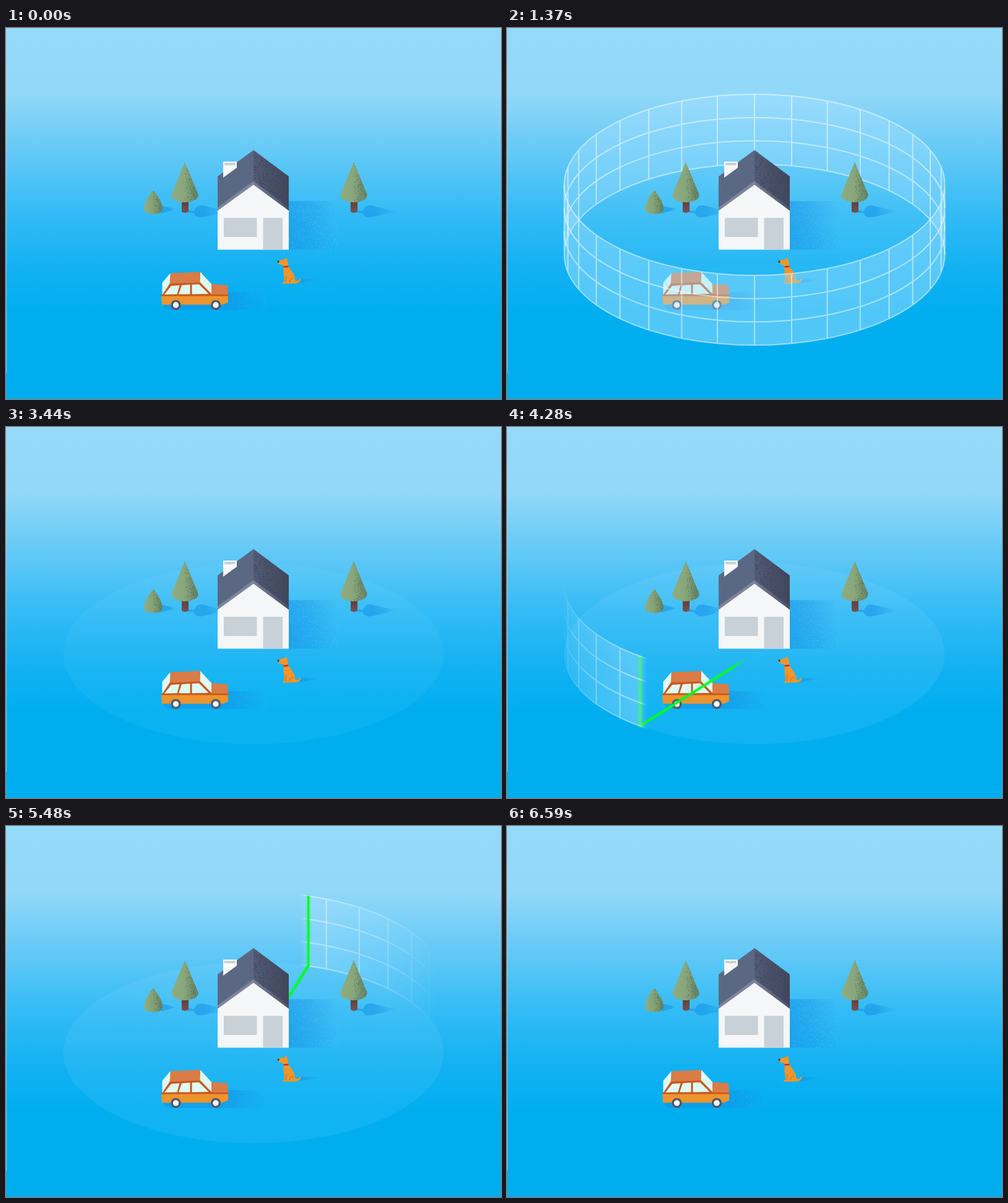
An HTML page with a canvas that plays this animation: 800x600 px, repeating every 6.62 s.

```html
<!DOCTYPE html>
<html lang="en">
<head>
<meta charset="utf-8">
<title>Home perimeter</title>
<style>
html, body { margin: 0; width: 100%; height: 100%; overflow: hidden; background: #00aef0; }
canvas { display: block; width: 800px; height: 600px; }
</style>
</head>
<body>
<canvas id="stage" width="800" height="600"></canvas>
<script>
const LOOP = 6620;
const CX = 400, CY = 366.5, RX = 307.5, RY = 146.5, WALL = 113;
const PI = Math.PI;
const ctx = document.getElementById('stage').getContext('2d');

// ---------- helpers ----------
let seed = 7;
const rand = () => (seed = (seed * 16807) % 2147483647) / 2147483647;
const clamp = (v, lo = 0, hi = 1) => Math.min(hi, Math.max(lo, v));
const sine = p => (1 - Math.cos(PI * clamp(p))) / 2;

function track(keys, t) {
  if (t <= keys[0][0]) return keys[0][1];
  for (let i = 1; i < keys.length; i++) {
    const [t1, v1] = keys[i], [t0, v0] = keys[i - 1];
    if (t <= t1) return v0 + (v1 - v0) * (t - t0) / (t1 - t0);
  }
  return keys[keys.length - 1][1];
}

function ramp(c, x0, y0, x1, y1, stops) {
  const g = c.createLinearGradient(x0, y0, x1, y1);
  stops.forEach(([p, color]) => g.addColorStop(p, color));
  return g;
}

function shape(c, d, paint) {
  c.fillStyle = paint;
  c.fill(new Path2D(d));
}

// Seeded specks inside a path; chance(u) sets density from left to right.
function grain(c, d, x, y, w, h, color, count, chance) {
  c.save();
  c.clip(new Path2D(d));
  c.fillStyle = color;
  for (let i = 0; i < count; i++) {
    const u = rand(), v = rand();
    if (rand() < chance(u)) c.fillRect(Math.floor(x + u * w), Math.floor(y + v * h), 1, 1);
  }
  c.restore();
}

// ---------- scenery ----------
const SHADE = 'rgba(20,145,230,.55)', CLEAR = 'rgba(20,145,230,0)';

function tree(c, x) {
  c.save();
  c.translate(x, 0);
  shape(c, 'M6 295 L15 296 Q18 286 28 287 L70 297 L28 306 Q18 308 14 299 L5 299 Z',
    ramp(c, 8, 0, 70, 0, [[0, SHADE], [.4, SHADE], [1, CLEAR]]));
  shape(c, 'M-5 278 H6 V297 Q0 301 -5 297 Z',
    ramp(c, 0, 278, 0, 299, [[0, '#5a3b3e'], [1, '#7a5150']]));
  const cone = 'M0 217 L21.5 269 Q23 276 12 280 Q0 284 -12 280 Q-23 276 -21.5 269 Z';
  shape(c, cone, ramp(c, -22, 0, 22, 0, [[0, '#8fad80'], [.5, '#88a67b'], [.7, '#789771'], [1, '#668467']]));
  grain(c, cone, 0, 217, 22, 66, '#58755d', 700, u => .15 + u * .4);
  c.restore();
}

function house(c) {
  const dark = 'M457 280 H536 V358.5 H457 Z';
  shape(c, dark, ramp(c, 457, 0, 536, 0, [[0, SHADE], [.45, 'rgba(20,145,230,.35)'], [1, CLEAR]]));
  grain(c, dark, 457, 280, 79, 79, 'rgba(80,195,248,.5)', 2200, u => .2 + u * .3);
  shape(c, 'M342 293 L400 252 L457 293 V358.5 H342 Z', '#f5f6f7');
  shape(c, 'M342 240 L400 197.5 V249 L342 292 Z', '#5b6883');
  const right = 'M400 197.5 L457 240 V292 L400 249 Z';
  shape(c, right, ramp(c, 400, 0, 457, 0, [[0, '#535d78'], [.5, '#484f67'], [1, '#41475d']]));
  grain(c, right, 400, 197, 57, 95, '#3a4056', 1500, u => .5 - u * .3);
  shape(c, 'M342 290 L400 247.5 V253.5 L342 295.5 Z', '#7d849b');
  shape(c, 'M400 247.5 L457 290 V295.5 L400 253.5 Z',
    ramp(c, 400, 0, 457, 0, [[0, '#777d94'], [1, '#4a5067']]));
  shape(c, 'M351 216 H373 V226 L351 242 Z', '#f7f8f8');
  shape(c, 'M353 218 H370.5 V222 H353 Z', '#cbd1d6');
  shape(c, 'M352 307 H405.5 V338 H352 Z', '#c9d1d8');
  shape(c, 'M415.5 307 H447 V358.5 H415.5 Z', '#c9d1d8');
}

function wheel(c, x) {
  [[8, '#50566b'], [4.7, '#ffffff']].forEach(([r, color]) => {
    c.fillStyle = color;
    c.beginPath();
    c.arc(x, 448, r, 0, 2 * PI);
    c.fill();
  });
}

function car(c) {
  const glass = '#ddfaf5', trim = '#c9571c', top = '#d97c45';
  const dark = 'M254 446 L350 440 L359 427 L420 429 V456 H262 Q254 454 254 446 Z';
  shape(c, dark, ramp(c, 254, 0, 418, 0, [[0, SHADE], [.65, SHADE], [1, CLEAR]]));
  grain(c, dark, 355, 427, 65, 29, 'rgba(40,180,245,.5)', 600, u => .2 + u * .3);
  shape(c, 'M265.5 396.5 L252.5 412 L252.5 432 L265.5 414 Z', glass);
  shape(c, 'M314 394.5 L332 414 V432 L313 413 Z', glass);
  shape(c, 'M266 396.5 L314 394.5 L313.5 413 L264.5 415 Z', top);
  shape(c, 'M264.5 413.5 L314 411.5 L333 431 V434 H251 Z', trim);
  shape(c, 'M267 417 L280.5 416 L276.5 430.5 L256 431 Z', glass);
  shape(c, 'M284 416 L297.5 415 V430.5 L279 430.5 Z', glass);
  shape(c, 'M300.5 415 L312 414.5 L327.5 430 L300.5 430.5 Z', glass);
  shape(c, 'M332 414 L358 416 L359 431.5 H332 Z', top);
  shape(c, 'M251 431 H359 V444 L350 447.5 H252 Z', '#ec942e');
  shape(c, 'M251 431 H359 V433.5 H251 Z', trim);
  wheel(c, 274.5);
  wheel(c, 339);
}

function bush(c) {
  shape(c, 'M250 287 L275 293 L250 300 Z', ramp(c, 250, 0, 275, 0, [[0, SHADE], [.6, SHADE], [1, CLEAR]]));
  const egg = 'M238 262 C244 269 253 283 253 292 C253 298 246 301 238 301 C230 301 223 298 223 292 C223 283 232 269 238 262 Z';
  shape(c, egg, ramp(c, 223, 0, 253, 0, [[0, '#8fad80'], [.5, '#83a177'], [1, '#64825f']]));
  grain(c, egg, 238, 262, 16, 39, '#5a775d', 350, u => .15 + u * .4);
}

const DOG = new Path2D('M439 377 L445 375 L449.5 374 L453.5 371.5 L455 376 L456.5 386 L463 395 Q468 402 467 408 ' +
  'Q473 410 475 405.5 L477 406.5 Q475 412 469 413 L447 413.5 Q446.5 411.5 450 410.5 L449.5 402 Q447.5 395 449 386 L447 383.5 L441 382 Z');

function dog(glow) {
  ctx.fillStyle = '#f0962b';
  ctx.fill(DOG);
  shape(ctx, 'M448.5 385 L456.5 384.5 V387 L449 387.5 Z', '#d2232a');
  shape(ctx, 'M438.6 376.6 H441.4 V379.6 H439 Z', '#30303a');
  ctx.strokeStyle = '#c9651f';
  ctx.lineWidth = 1;
  ctx.stroke(new Path2D('M453 401 L452.5 411 M465 405 Q459 404 458 411'));
  if (glow <= 0) return;
  ctx.save();
  ctx.globalAlpha = glow;
  ctx.shadowColor = '#00ff2a';
  ctx.fillStyle = '#fff373';
  [26, 14, 7].forEach(blur => { ctx.shadowBlur = blur; ctx.fill(DOG); });
  ctx.restore();
}

function buildScene() {
  const layer = document.createElement('canvas');
  layer.width = 800;
  layer.height = 600;
  const c = layer.getContext('2d');
  bush(c);
  tree(c, 289);
  tree(c, 562);
  house(c);
  car(c);
  shape(c, 'M466 409 L478 405.5 L508 407 L478 412 L462 413 Z',
    ramp(c, 464, 0, 508, 0, [[0, SHADE], [.4, SHADE], [1, CLEAR]]));
  return layer;
}

const scene = buildScene();
const sky = ramp(ctx, 0, 0, 0, 600, [[0, '#96daf9'], [.18, '#91d8f8'], [.3, '#6eccf7'],
  [.5, '#33bbf5'], [.65, '#12b1f2'], [.765, '#00aef0'], [1, '#00aef0']]);

// ---------- wall ----------
const tint = a => `rgba(165,225,255,${a})`;
const white = a => `rgba(255,255,255,${a})`;

// One half of the ring: rings hang from the top edge and end at the ground.
function wall(front, h, fill, line) {
  const a0 = front ? 0 : PI;
  ctx.fillStyle = fill;
  ctx.beginPath();
  ctx.ellipse(CX, CY, RX, RY, 0, a0, a0 + PI);
  ctx.ellipse(CX, CY - h, RX, RY, 0, a0 + PI, a0, true);
  ctx.fill();
  ctx.strokeStyle = line;
  ctx.lineWidth = 2;
  ctx.beginPath();
  for (let k = 0; k < 4; k++) {
    const y = h - k * WALL / 3;
    if (y < -.01) break;
    ctx.moveTo(CX + RX * Math.cos(a0), CY - y);
    ctx.ellipse(CX, CY - y, RX, RY, 0, a0, a0 + PI);
  }
  for (let i = 0; i < 16; i++) {
    const a = a0 + i * PI / 16, x = CX + RX * Math.cos(a), y = CY + RY * Math.sin(a);
    ctx.moveTo(x, y);
    ctx.lineTo(x, y - h);
  }
  ctx.stroke();
}

// ---------- sweep ----------
const SWEEP = 3890, TRAIL = 58;

function leadAngle(t) {
  const s = (t - SWEEP) / 1000;
  return 180 - 128 * s - 19.6 * s * s;
}

function trailAlpha(d) {
  if (d < -2.2 || d > TRAIL) return 0;
  return d < 0 ? 1 + d / 2.2 : Math.pow(1 - d / TRAIL, 1.25);
}

function sweepPaint(front, lead, color, strength) {
  const g = ctx.createLinearGradient(CX - RX, 0, CX + RX, 0), n = 100;
  for (let i = 0; i <= n; i++) {
    const a = Math.acos(2 * i / n - 1) * 180 / PI;
    g.addColorStop(i / n, color((trailAlpha((front ? a : -a) - lead) * strength).toFixed(3)));
  }
  return g;
}

function sweepWall(front, lead) {
  wall(front, WALL, sweepPaint(front, lead, tint, .42), sweepPaint(front, lead, white, .5));
}

function beam(lead, alpha) {
  const a = lead * PI / 180, x = CX + RX * Math.cos(a), y = CY + RY * Math.sin(a);
  ctx.save();
  ctx.globalAlpha = alpha;
  ctx.lineWidth = 3.5;
  ctx.lineCap = ctx.lineJoin = 'round';
  ctx.shadowColor = 'rgba(0,255,40,.6)';
  ctx.shadowBlur = 4;
  ctx.strokeStyle = ramp(ctx, CX, CY, x, y, [[0, 'rgba(0,255,30,0)'], [.08, 'rgba(0,255,30,0)'],
    [.2, '#05fb23'], [1, '#05fb23']]);
  ctx.beginPath();
  ctx.moveTo(CX, CY);
  ctx.lineTo(x, y);
  ctx.stroke();
  ctx.strokeStyle = '#05fb23';
  ctx.beginPath();
  ctx.moveTo(x, y);
  ctx.lineTo(x, y - WALL + 1);
  ctx.stroke();
  ctx.restore();
}

// ---------- timeline ----------
const FLOOR = [[500, 0], [900, .3], [1010, .3], [1370, .12], [2870, .12], [3290, .2],
  [3440, .06], [3620, .1], [5960, .1], [6580, 0]];
const RING = [[500, 0], [900, 1], [3250, 1], [3390, 0]];

function draw(t) {
  const ring = track(RING, t);
  const height = WALL * (sine((t - 920) / 450) - sine((t - 2870) / 430));
  const lead = leadAngle(t);
  const sweeping = t >= SWEEP && lead > -180 - TRAIL;
  const beamAlpha = sweeping ? clamp((t - SWEEP) / 100) * clamp((lead + 180) / 15) : 0;
  const glow = sweeping ? clamp(1.25 - Math.abs(lead - 47) / 16) : 0;

  ctx.fillStyle = sky;
  ctx.fillRect(0, 0, 800, 600);
  ctx.fillStyle = 'rgba(215,215,215,.6)';
  ctx.fillRect(0, 60, 1, 498);

  ctx.fillStyle = tint(track(FLOOR, t));
  ctx.beginPath();
  ctx.ellipse(CX, CY, RX, RY, 0, 0, 2 * PI);
  ctx.fill();

  if (ring > 0) wall(false, height, tint(.42 * ring), white(.5 * ring));
  if (sweeping) sweepWall(false, lead);
  if (beamAlpha > 0 && lead < 0) beam(lead, beamAlpha);

  ctx.drawImage(scene, 0, 0);
  if (beamAlpha > 0 && lead >= 0) beam(lead, beamAlpha);
  dog(glow);

  if (ring > 0) wall(true, height, tint(.42 * ring), white(.5 * ring));
  if (sweeping) sweepWall(true, lead);
}

const start = performance.now();
function tick() {
  draw((performance.now() - start) % LOOP);
  requestAnimationFrame(tick);
}
tick();
</script>
</body>
</html>
```
